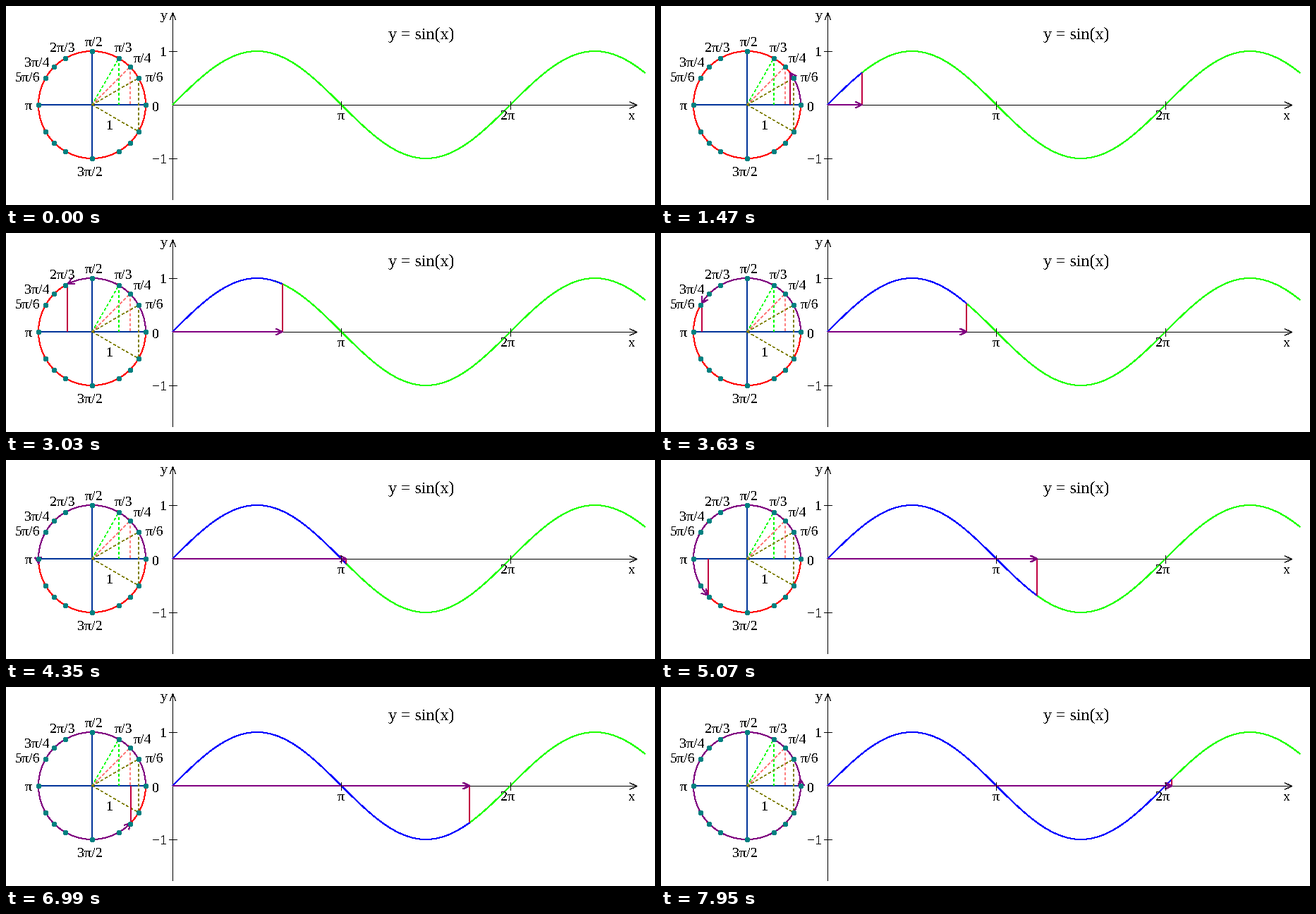
A matplotlib script that plays this animation: 920x282 px, repeating every 8 s.

```python
import numpy as np
import matplotlib.pyplot as plt
from matplotlib.animation import FuncAnimation

W, H, DPI = 920, 282, 64
PX = 72 / DPI                      # points per pixel
CX, CY, R = 122, 140, 76           # unit circle
X0, PERIOD, X_END = 236, 479, 906  # graph
LOOP, TICK = 8000, 20
FIRST, STEP = 870, 120

# Without antialiasing every touched pixel is filled, so slanted
# strokes are drawn one pixel thinner than they should look.
HAIR, THIN = 0.1, 1

PURPLE, CRIMSON, BLUE = "#800080", "#c00040", "#0000ff"
GREEN, RED, NAVY, TEAL = "#20ff00", "#ff0000", "#003399", "#008080"

# where the arrow on the x axis stands after a number of steps
KEY_STEP = [0, 7, 14, 21, 24, 28, 35, 36, 42, 43, 49, 52, 56, 60]
KEY_X = [236, 293, 351, 408, 433, 466, 523, 533, 582, 589, 633, 657, 689, 724]

plt.rcParams.update({
    "font.family": "Liberation Serif",
    "text.antialiased": False,
    "text.hinting": "native",
    "lines.solid_capstyle": "butt",
    "lines.antialiased": False,
    "lines.scale_dashes": False,
})

fig = plt.figure(figsize=(W / DPI, H / DPI), dpi=DPI, facecolor="white")
ax = fig.add_axes([0, 0, 1, 1])
ax.set_xlim(0, W)
ax.set_ylim(H, 0)
ax.axis("off")


def line(xs, ys, color, width=2, z=2, **kw):
    return ax.plot(xs, ys, color=color, lw=width * PX, zorder=z, **kw)[0]


def dashed(xs, ys, color):
    line(xs, ys, color, HAIR, 4, dashes=(3 * PX, 3 * PX))


def on_circle(a):
    return CX + R * np.cos(a), CY - R * np.sin(a)


def wave(x):
    return CY - R * np.sin(2 * np.pi * (x - X0) / PERIOD)


def head(x, y, dx, dy, length=9, half=4.5):
    """Open arrowhead with its tip at x, y and pointing along dx, dy."""
    bx, by = x - length * dx, y - length * dy
    return ([bx - half * dy, x, bx + half * dy],
            [by + half * dx, y, by - half * dx])


def label(text, x, y, size=20):
    ax.text(x, y, text, fontsize=size * PX, color="black",
            ha="left", va="baseline", zorder=9)


# coordinate axes
line([X0, X0], [9, 274], "black", 1)
line([X0, 894], [CY, CY], "black", 1)
line(*head(X0 + 0.5, 9.5, 0, -1, 10, 4), "black", HAIR)
line(*head(894.5, CY + 0.5, 1, 0, 10, 4.5), "black", HAIR)
for y in (CY - R, CY + R):
    line([231, 242], [y, y], "black", 1, 8)
for x in (475, 715):
    line([x, x], [135, 146], "black", 1, 8)

# sine curve
xs = np.linspace(X0, X_END, 671)
line(xs, wave(xs), GREEN, THIN, 3)

# unit circle
line(*on_circle(np.linspace(0, 2 * np.pi, 361)), RED, THIN, 3)
line([CX - R, CX + R], [CY, CY], NAVY, 2, 3)
line([CX, CX], [CY - R, CY + R], NAVY, 2, 3)
for deg, color in ((60, "#00ff00"), (45, "#ff8080"), (30, "#808000")):
    px, py = np.round(on_circle(np.radians(deg)))
    foot = CY
    dashed([CX, px], [CY, py], color)
    if deg == 30:
        foot = 2 * CY - py
        dashed([CX, px], [CY, foot], color)
    dashed([px, px], [py, foot], color)

for quarter in (0, 90, 180, 270):
    for deg in (0, 30, 45, 60):
        px, py = np.round(on_circle(np.radians(quarter + deg)))
        ax.add_patch(plt.Circle((px + 0.5, py + 0.5), 3.1, fc=TEAL, lw=0,
                                antialiased=False, zorder=8))

for item in (("π/2", 112, 57), ("π/3", 154, 65), ("π/4", 181, 80),
             ("π/6", 198, 107), ("2π/3", 62, 65), ("3π/4", 26, 86),
             ("5π/6", 13, 107), ("π", 27, 147), ("3π/2", 101, 241),
             ("0", 207, 149), ("1", 142, 175), ("1", 218, 71),
             ("−1", 207, 223), ("π", 470, 161), ("2π", 701, 161),
             ("x", 882, 161), ("y", 219, 19), ("y = sin(x)", 542, 47, 24)):
    label(*item)

# moving parts
trace = line([], [], BLUE, THIN, 5)
height = line([], [], CRIMSON, 2, 6)
chord = line([], [], CRIMSON, 2, 6)
arc = line([], [], PURPLE, THIN, 7)
arc_head = line([], [], PURPLE, THIN, 7)
span = line([], [], PURPLE, 2, 7)
span_head = line([], [], PURPLE, THIN, 7)
moving = [trace, height, chord, arc, arc_head, span, span_head]


def update(i):
    t = i * TICK + TICK // 2
    step = (t - FIRST) // STEP + 1
    for part in moving:
        part.set_visible(step > 0)
    if step <= 0:
        return moving

    x = np.interp(step, KEY_STEP, KEY_X)
    y = wave(x)
    a = 2 * np.pi * (x - X0) / PERIOD
    px, py = on_circle(a)

    run = np.linspace(X0, x, int(x - X0) + 1)
    trace.set_data(run, wave(run))
    height.set_data([x, x], [CY, y])
    span.set_data([X0, x], [CY, CY])
    span_head.set_data(*head(x, CY, 1, 0))

    chord.set_data([px, px], [CY, py])
    arc.set_data(*on_circle(np.linspace(0, min(a, 2 * np.pi), 240)))
    arc_head.set_data(*head(px, py, -np.sin(a), -np.cos(a)))
    return moving


anim = FuncAnimation(fig, update, frames=LOOP // TICK, interval=TICK,
                     init_func=lambda: update(0), repeat=True, repeat_delay=0,
                     blit=False)
plt.show()
```
